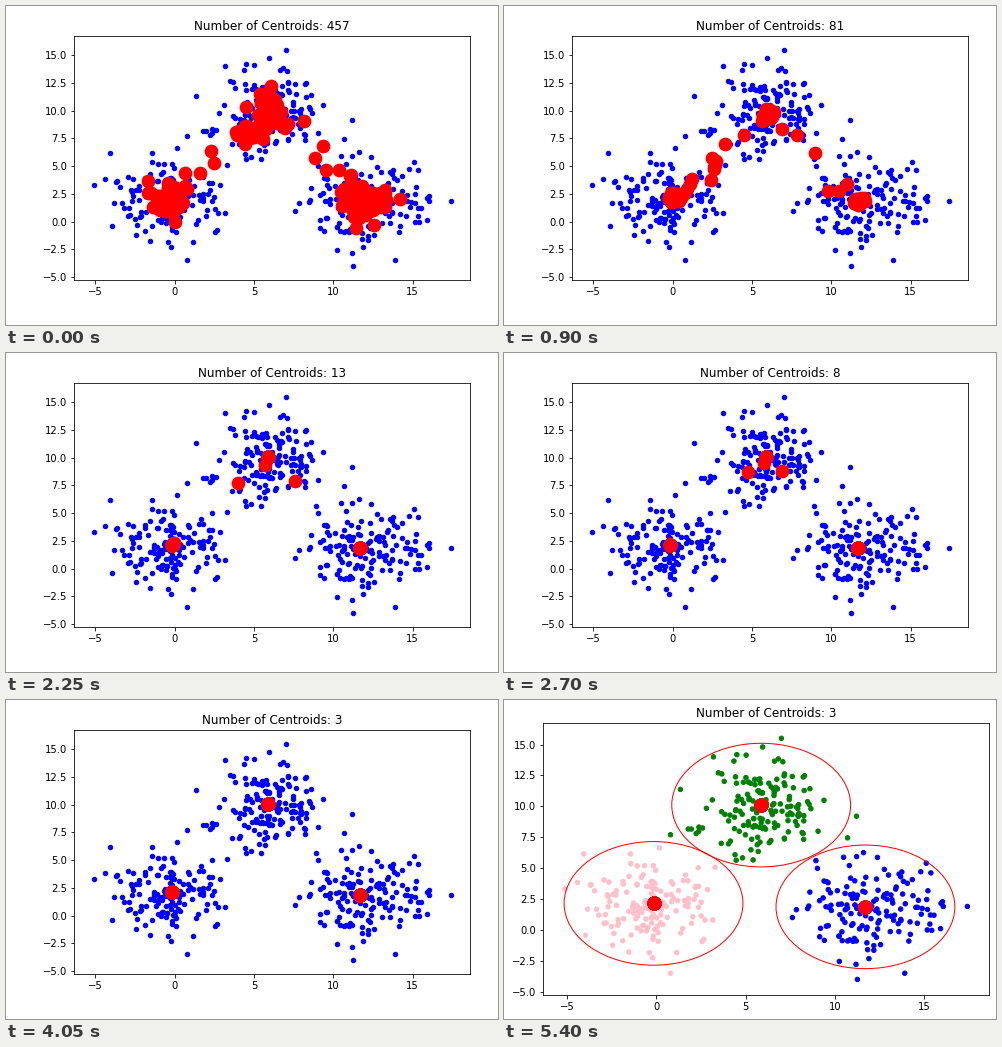
Animation of 492x319 px, one loop 5850 ms. Source, as a matplotlib script:

```python
import matplotlib.pyplot as plt
import numpy as np
from matplotlib.animation import FuncAnimation
from matplotlib.patches import Circle

W, H, DPI = 492, 319, 72
XLIM, YLIM = (-6.33, 18.61), (-5.26, 16.74)
SMALL = (68, 30, 464, 274)   # axes box: left, top, right, bottom
LARGE = (39, 23, 485, 295)
STEP = 450
RADIUS = 5

LEFT, TOP, RIGHT = HOMES = np.array([(-0.15, 2.15), (5.87, 10.1), (11.7, 1.87)])
HUES = np.array(["pink", "green", "blue"])
COUNTS = [457, 236, 81, 31, 18, 13, 8, 5, 5, 3, 3, 3, 3]
COLORED, RINGED = 10, 12

rng = np.random.default_rng(7)


def cloud(n, center, sigma, limit):
    """Normal cloud cut off at a number of sigmas."""
    z = rng.normal(size=(n * 3, 2))
    z = z[np.hypot(*z.T) < limit][:n]
    return center + sigma * z


def distances(a, b):
    return np.linalg.norm(a[:, None] - b[None], axis=2)


def mean_shift(points):
    near = distances(points, points) < RADIUS
    return near @ points / near.sum(axis=1, keepdims=True)


# Three normal clusters and a few far outliers.
OUTLIERS = [(-5.1, 3.3), (-4.05, 6.15), (0.8, -3.5), (0.8, 7.7), (3.2, 14),
            (7, 15.5), (5.95, 14.8), (11.2, 9.2), (10.7, 7.45), (11.25, -4),
            (13.9, -3.5), (15.1, 5.4), (16.05, 1.9), (17.4, 1.9)]
points = np.vstack([OUTLIERS] + [cloud(152, home, 2, 2.35) for home in HOMES])
by_cluster = HUES[distances(points, HOMES).argmin(axis=1)]
first_shift = mean_shift(points)

# Groups drifting home: start positions, home, steps until they merge.
GROUPS = [
    (cloud(30, (0.2, 2.2), 0.4, 1.7), LEFT, 2),
    (cloud(20, (6, 9.6), 0.45, 1.7), TOP, 2),
    (cloud(30, RIGHT, 0.4, 1.7), RIGHT, 2),
    (np.linspace((0.9, 2.6), (1.35, 4), 4), LEFT, 4.1),
    (np.linspace((2.9, 5), (3, 5.8), 3), LEFT, 4.1),
    (np.array([(2.9, 4.1)]), LEFT, 3),
    (np.array([(2.3, 5.5), (9.15, 6)]), TOP, 6.2),
    (np.array([(3, 6.6)]), TOP, 3.7),
    (np.array([(4.1, 7.2), (7.2, 7.8), (8.45, 7.1)]), TOP, 2.4),
    (np.array([(5.65, 9)]), TOP, 8),
    (np.array([(8.95, 3.1), (9.9, 3.1), (10.7, 4.1)]), RIGHT, 2),
]


def centroids(step):
    if step == 0:
        return first_shift
    found = [HOMES]
    for starts, home, span in GROUPS:
        left_over = 1 - min((step - 1) / span, 1) ** 1.7
        found.append(home + (starts - home) * left_over)
    return np.vstack(found)


plt.rcParams["font.family"] = "DejaVu Sans"
fig = plt.figure(figsize=((W + 0.01) / DPI, (H + 0.01) / DPI), dpi=DPI,
                 facecolor="white")
ax = fig.add_subplot()
dots = ax.scatter(*points.T, s=20, c="blue", linewidths=1, zorder=2)
centers = ax.scatter([], [], s=150, c="red", linewidths=1.5, zorder=3)
rings = [ax.add_patch(Circle(home, RADIUS, fill=False, color="red", lw=1,
                             zorder=2.5)) for home in HOMES]
ax.set(xlim=XLIM, ylim=YLIM, xticks=np.arange(-5, 16, 5),
       yticks=np.arange(-5, 15.1, 2.5))
ax.tick_params(labelsize=10)
title = ax.set_title("", fontsize=12)


def place(box):
    x0, y0, x1, y1 = box
    ax.set_position([x0 / W, 1 - y1 / H, (x1 - x0) / W, (y1 - y0) / H])


def update(step):
    title.set_text(f"Number of Centroids: {COUNTS[step]}")
    centers.set_offsets(centroids(step))
    dots.set_color(by_cluster if step >= COLORED else "blue")
    for ring in rings:
        ring.set_visible(step >= RINGED)
    place(LARGE if step >= RINGED else SMALL)
    return dots, centers, title, *rings


anim = FuncAnimation(fig, update, frames=len(COUNTS), interval=STEP,
                     init_func=lambda: update(0), repeat=True, repeat_delay=0,
                     blit=False)
plt.show()
```
